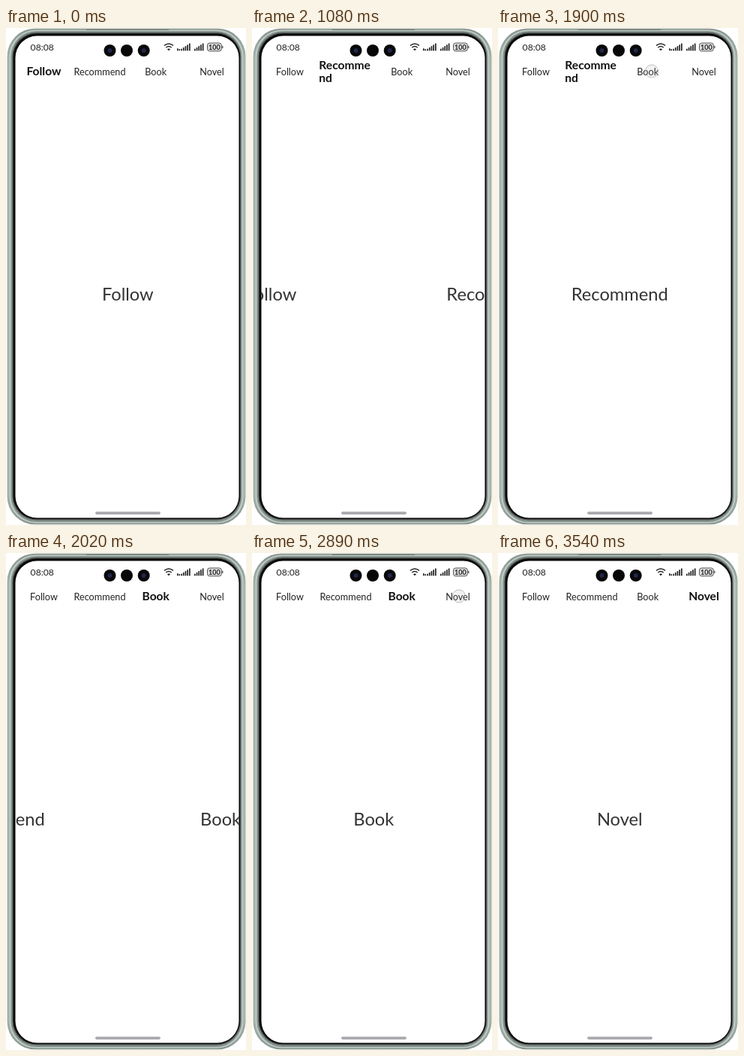
An HTML page for the animation above (4250 ms loop, 320x662 px).

```html
<!DOCTYPE html>
<html lang="en">
<head>
<meta charset="utf-8">
<title>Tabs</title>
<style>
  html, body { margin: 0; width: 100%; height: 100%; overflow: hidden; background: #fff; }
  svg { display: block; width: 100%; height: 100%; }
  text { font-family: Lato, "Open Sans", sans-serif; fill: #222; }
  .mid { text-anchor: middle; }
  .page { font-size: 23.7px; fill: #333; }
  .tab { font-size: 12.7px; }
  .bold { font-size: 15.6px; font-weight: 700; fill: #111; }
</style>
</head>
<body>
<svg viewBox="0 0 320 662">
  <defs>
    <clipPath id="screen"><rect x="12" y="10.5" width="298.5" height="642" rx="29"/></clipPath>
    <linearGradient id="rim" x2="0" y2="1">
      <stop offset="0" stop-color="#87948e"/>
      <stop offset=".06" stop-color="#a3b2ab"/>
      <stop offset=".94" stop-color="#a3b2ab"/>
      <stop offset="1" stop-color="#87948e"/>
    </linearGradient>
  </defs>
  <rect x="1.5" y=".8" width="318" height="660.4" rx="37" fill="url(#rim)"/>
  <rect x="4.5" y="2.5" width="312" height="657" rx="35" fill="#c0cbc6"/>
  <rect x="6.5" y="4" width="308" height="654" rx="34" fill="#84918b"/>
  <rect x="8.5" y="6" width="304.5" height="649.5" rx="32" fill="#4b504e"/>
  <rect x="9.7" y="7.6" width="302.3" height="646.4" rx="31" fill="#080808"/>
  <rect x="12.5" y="10.5" width="298" height="642" rx="29" fill="#fff"/>
  <path d="M107 2.2H217" stroke="#75827c" stroke-width="1.6"/>

  <text x="32.6" y="30.2" font-size="12.2">08:08</text>
  <g fill="#080808">
    <circle cx="138.5" cy="30" r="8"/>
    <circle cx="161" cy="30" r="8"/>
    <circle cx="183.7" cy="30" r="8"/>
  </g>
  <g fill="#20264a">
    <circle cx="138.5" cy="30" r="3"/>
    <circle cx="183.7" cy="30" r="3"/>
  </g>
  <g fill="none" stroke="#222" stroke-width="1.4">
    <path d="M211 23.4Q217 18.6 223 23.4M213.2 26Q217 23 220.8 26"/>
    <path d="M215.2 28.3Q217 27 218.8 28.3L217 30Z" fill="#222" stroke-width=".5"/>
  </g>
  <g id="bars" fill="#222"></g>
  <rect x="268.5" y="20" width="18.8" height="10.8" rx="3" fill="#ddd" stroke="#555"/>
  <path d="M288.8 23.8V27" stroke="#555" stroke-width="1.3"/>
  <text class="mid" x="277.9" y="28.7" font-size="9" font-weight="700">100</text>

  <g id="tabs"></g>
  <g clip-path="url(#screen)"><g id="pages"></g></g>
  <circle id="touch" cy="57.5" r="8.5" fill="#999" fill-opacity=".13" stroke="#b4a9a9" stroke-opacity=".75"/>
  <rect x="119" y="644.3" width="87" height="3.6" rx="1.8" fill="#aaa9ae"/>
</svg>
<script>
const LOOP = 4250, STEP = 40, SLIDE = 300, PAGE = 299, MID = 162.3;
const TABS = [['Follow', 50.5], ['Recommend', 125], ['Book', 199.7], ['Novel', 274.5]];
const TAPS = [
  { at: 960, wait: 54, x: 130 },
  { at: 1900, wait: 36, x: 205 },
  { at: 2890, wait: 34, x: 276 }
];
const $ = id => document.getElementById(id);

function add(parent, tag, attrs, text = '') {
  const el = document.createElementNS('http://www.w3.org/2000/svg', tag);
  for (const k in attrs) el.setAttribute(k, attrs[k]);
  el.textContent = text;
  return parent.appendChild(el);
}

function signal(x) {
  for (let i = 0; i < 5; i++) {
    const height = 2.6 + i * 1.8;
    add($('bars'), 'rect', { x: x + i * 2.7, y: 30.3 - height, width: 1.7, height });
  }
}
signal(233.2);
signal(251);
add($('bars'), 'rect', { x: 228, y: 27.2, width: 1.6, height: 3 });
add($('bars'), 'rect', { x: 230.4, y: 28, width: 1.5, height: 2.2 });

// Each tab has a plain and a bold label; the long bold one wraps.
const labels = TABS.map(([name, x]) => {
  const plain = add($('tabs'), 'text', { class: 'tab mid', x, y: 63.2 }, name);
  const bold = add($('tabs'), 'g', {});
  if (name.length > 7) {
    add(bold, 'text', { class: 'bold', x: 89.3, y: 55 }, name.slice(0, 7));
    add(bold, 'text', { class: 'bold', x: 89.3, y: 72 }, name.slice(7));
  } else {
    add(bold, 'text', { class: 'bold mid', x, y: 63.3 }, name);
  }
  return { plain, bold };
});
TABS.forEach(([name], i) =>
  add($('pages'), 'text', { class: 'page mid', x: MID + i * PAGE, y: 362.8 }, name));

const bez = (s, a, b) => 3 * (1 - s) ** 2 * s * a + 3 * (1 - s) * s * s * b + s ** 3;

// cubic-bezier(.2, 0, .1, 1)
function ease(x) {
  if (x <= 0) return 0;
  if (x >= 1) return 1;
  let lo = 0, hi = 1;
  for (let i = 0; i < 24; i++) {
    const s = (lo + hi) / 2;
    if (bez(s, .2, .1) < x) lo = s; else hi = s;
  }
  return bez(lo, 0, 1);
}

const show = (el, on) => el.setAttribute('visibility', on ? 'visible' : 'hidden');

function draw(t) {
  let pos = 0, active = 0, touch = null;
  for (const tap of TAPS) {
    if (t < tap.at) break;
    const dt = Math.floor((t - tap.at) / STEP) * STEP - tap.wait;
    if (dt < 0) touch = tap;
    else active++;
    pos += ease(dt / SLIDE);
  }
  labels.forEach(({ plain, bold }, i) => {
    show(plain, i !== active);
    show(bold, i === active);
  });
  $('pages').setAttribute('transform', `translate(${-pos * PAGE} 0)`);
  show($('touch'), touch);
  if (touch) $('touch').setAttribute('cx', touch.x);
}

const start = performance.now();
function tick() {
  draw((performance.now() - start) % LOOP);
  requestAnimationFrame(tick);
}
tick();
</script>
</body>
</html>
```
